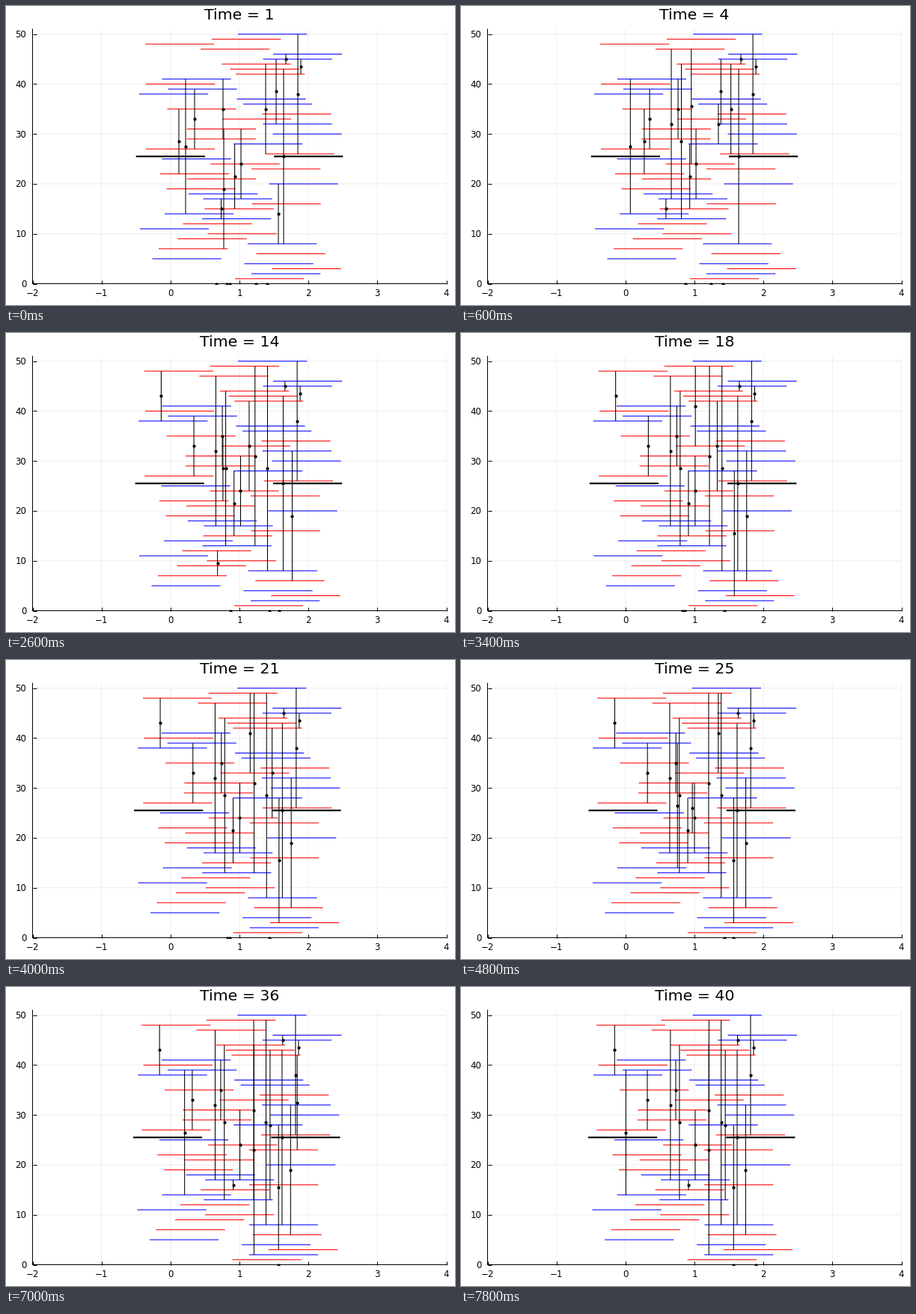
Write a matplotlib script that moves like this. It is 600 px wide and 400 px high and loops after 8000 ms.

```python
import numpy as np
import matplotlib.pyplot as plt
from matplotlib.animation import FuncAnimation
from matplotlib.collections import LineCollection

W, H = 600, 400
LEFT, RIGHT, TOP, BOTTOM = 35.5, 588.5, 31, 371.5
UNIT = (RIGHT - LEFT) / 6      # pixels per x unit, also the filament length
STEP = 0.05 * UNIT             # distance a motor walks per frame
PUSH_RED, PUSH_BLUE = -0.06, 0.08   # slide per frame from one stalled motor
FRAMES, INTERVAL = 40, 200
PT = 0.72                      # points per pixel at 100 dpi

# Left ends of filaments 1..50 in pixels; a minus sign marks blue polarity
LAYOUT = np.array([
    306, -328, 355.5, -318.5, -195.5, 334.5, 204, -323, 229.5, 269.5,
    -179, 236.5, -262, -212, 265.5, 328.5, -263.5, -244, 214.5, -351.5,
    242, 206, 328, 273.5, -208.5, 346.5, 187, -304, 241.5, -356.5,
    242, -343.5, 289, 342.5, 215.5, -317, -308.5, -178, -216.5, 187,
    -208.5, 307, 299.5, 288.5, -343.5, -357, 260, 186, 275, -310])
BLUE = LAYOUT < 0

# Each motor: start x, then the (time, filament, filament) it binds to
MOTORS = [
    (252, (0, 27, 39)), (290, (0, 29, 41)), (314, (0, 17, 31)),
    (371, (0, 8, 43)), (374, (0, 44, 46)), (390, (0, 26, 50)),
    (394, (0, 42, 45)), (281, (3, 17, 47)), (294.5, (2, 13, 44)),
    (333.6, (4, 13, 49)),
    (231, (0, 22, 35), (22, 14, 39)),
    (240, (0, 14, 41), (10, 38, 48)),
    (291, (0, 7, 31), (14, 33, 49), (29, 23, 42)),
    (287.5, (0, 13, 17), (8, 7, 12), (21, 21, 31), (30, 2, 44)),
    (305.6, (0, 15, 28), (26, 15, 17)),
    (347, (0, 26, 44), (10, 6, 32)),
    (361, (0, 32, 45), (4, 15, 24), (8, 10, 24), (17, 3, 28)),
    (364, (0, 8, 20), (5, 8, 49)),
    (298.5, (1, 24, 47), (28, 13, 43)),
    (348.5, (2, 28, 36), (11, 24, 42)),
]


def common(t):
    """Eased shift shared by every filament and both anchors."""
    u = np.clip((t - 3) / 27, 0, 1)
    return -3.8 * u * u * (3 - 2 * u)


def heading(pair):
    """Equal polarity walks to the filament's plus end, mixed stalls."""
    a, b = BLUE[pair]
    return 0 if a != b else (-1 if a else 1)


def past_end(x, way, ends):
    return way > 0 and x > ends.min() + UNIT or way < 0 and x < ends.max()


def simulate():
    rods = np.abs(LAYOUT)
    xs = [m[0] for m in MOTORS]
    pairs = [None] * len(MOTORS)
    history = []
    for t in range(FRAMES):
        if t:
            move = np.full(len(rods), common(t) - common(t - 1) + 0.01)
            for pair in pairs:
                if pair is not None and heading(pair) == 0:
                    move[pair] += np.where(BLUE[pair], PUSH_BLUE, PUSH_RED)
            rods = rods + move
        for i, (_, *bindings) in enumerate(MOTORS):
            pair = pairs[i]
            if pair is not None:
                way = heading(pair)
                xs[i] += move[pair].mean() + way * STEP
                if past_end(xs[i], way, rods[pair]):
                    pairs[i] = None
            for when, a, b in bindings:
                if when == t:
                    pairs[i] = np.array([a - 1, b - 1])
        history.append((rods, list(zip(xs, pairs))))
    return history


HISTORY = simulate()

fig = plt.figure(figsize=(W / 100, H / 100), dpi=100, facecolor="white")
ax = fig.add_axes([LEFT / W, 1 - BOTTOM / H,
                   (RIGHT - LEFT) / W, (BOTTOM - TOP) / H])
ax.set_xlim(LEFT, RIGHT)
ax.set_ylim(0, 51)
ax.set_xticks([LEFT + k * UNIT for k in range(7)], [""] * 7)
ax.set_yticks(range(0, 51, 10), [""] * 6)
ax.tick_params(direction="in", length=5 * PT, width=1 * PT)
ax.grid(color="#eeeeee", linewidth=1 * PT, snap=False)
ax.set_axisbelow(True)
for side, spine in ax.spines.items():
    spine.set_visible(side in ("left", "bottom"))
    spine.set_linewidth(1 * PT)
    spine.set_snap(False)


def label(x, y, text, px, ha="center"):
    return fig.text(x / W, 1 - y / H, text, fontsize=px * PT, ha=ha,
                    va="baseline", family="DejaVu Sans")


for k in range(7):
    label(LEFT + k * UNIT, 388, str(k - 2).replace("-", "\u2212"), 11.7)
for v in range(0, 51, 10):
    y = BOTTOM - v * (BOTTOM - TOP) / 51
    label(27.2, y + 4.3, str(v), 11.7, ha="right")
title = label(312, 18.5, "", 20.5)


def lines(width, colors, z):
    group = LineCollection([], linewidths=width * PT, colors=colors, zorder=z)
    group.set_snap(False)
    return ax.add_collection(group, autolim=False)


rods = lines(1.05, np.where(BLUE, "blue", "red"), 2)
anchors = lines(2.1, "black", 3)
links = lines(1.05, "black", 4)
dots, = ax.plot([], [], "o", color="black", ms=4.2 * PT, mew=0, zorder=5)


def bar(x, y):
    return [(x, y), (x + UNIT, y)]


def draw(t):
    lefts, motors = HISTORY[t]
    title.set_text(f"Time = {t + 1}")
    rods.set_segments([bar(x, n + 1) for n, x in enumerate(lefts)])
    anchors.set_segments([bar(LEFT + u * UNIT + common(t), 25.5)
                          for u in (1.5, 3.5)])
    links.set_segments([[(x, p[0] + 1), (x, p[1] + 1)]
                        for x, p in motors if p is not None])
    dots.set_data([x for x, _ in motors],
                  [0 if p is None else p.mean() + 1 for _, p in motors])
    return rods, anchors, links, dots, title


anim = FuncAnimation(fig, draw, frames=FRAMES, interval=INTERVAL,
                     repeat=True, repeat_delay=0, blit=False)
plt.show()
```
